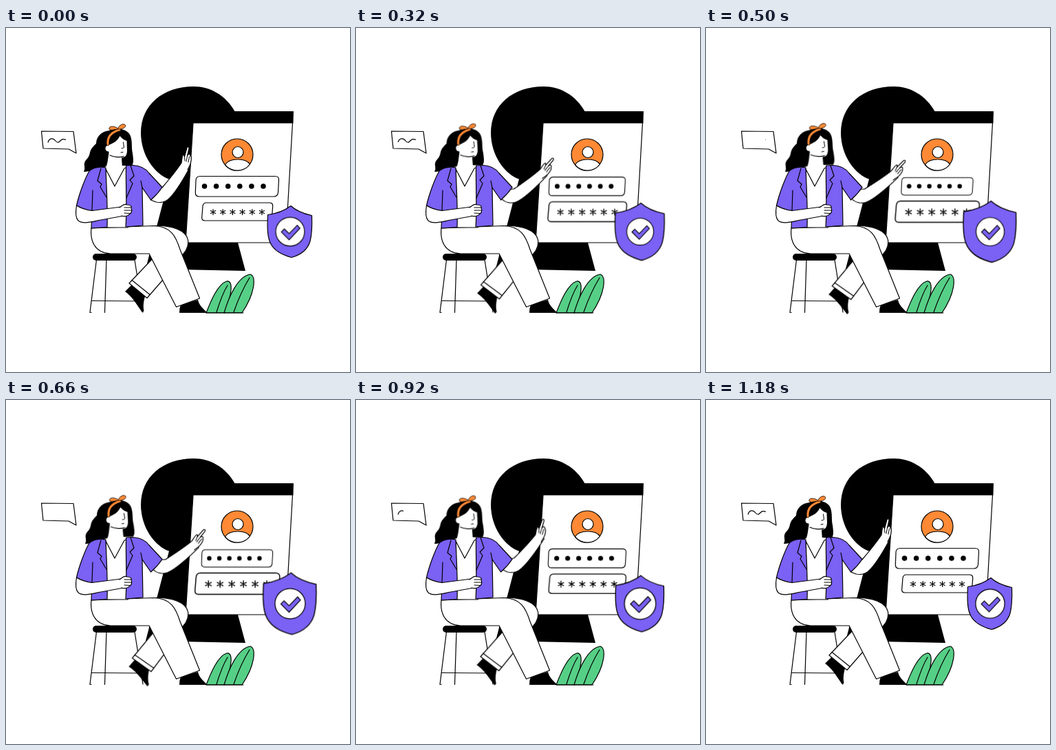
Animation, 500 px wide and 500 px high, one loop 1.2 s. Source, as an HTML page:

```html
<!DOCTYPE html>
<html lang="en">
<head>
<meta charset="utf-8">
<title>Secure sign-in</title>
<style>
html, body { margin: 0; width: 100%; height: 100%; overflow: hidden; background: #fff; }
svg { display: block; width: 100vw; height: 100vh; }

.ln { fill: none; stroke: #000; stroke-width: 1.2; stroke-linejoin: round; stroke-linecap: round; }
.w { fill: #fff; }
.p { fill: #7b61f4; }
.o { fill: #ff8934; }
.g { fill: #56cf86; }
.k { fill: #000; stroke: none; }

/* Slow back-and-forth parts share one sine-like swing */
.swing { animation: 600ms cubic-bezier(.37, 0, .63, 1) infinite alternate; }
#user { transform-origin: 336px 230px; animation-name: shrink; }
#pass { transform-origin: 336px 267px; animation-name: grow; }
#shield { transform-origin: 412.5px 296px; animation-name: grow; }
#badge { transform-origin: 413px 296px; animation-name: pulse; animation-delay: -930ms; }
#farLeg { transform-origin: 240px 310px; animation-name: kick; }
#head { transform-origin: 155px 180px; animation-name: nod; }

#lift { animation: lift 1200ms ease-in-out infinite; }
#arm { transform-origin: 222px 244px; animation: point 1200ms cubic-bezier(.42, 0, .58, 1) infinite; }
#hand { transform-origin: 260px 199px; animation: wrist 1200ms ease-in-out infinite; }
#note { stroke-dasharray: 100 200; stroke-linecap: butt; animation: note 1200ms linear infinite; }

@keyframes shrink { to { transform: scale(.85); } }
@keyframes grow { to { transform: scale(1.2); } }
@keyframes pulse { from { transform: scale(.92); } to { transform: scale(1.08); } }
@keyframes kick { to { transform: rotate(-4.2deg); } }
@keyframes nod { to { transform: translate(1.4px, -.8px) rotate(-1.4deg); } }
@keyframes lift { 0%, 40%, 92%, 100% { transform: none; } 68% { transform: translate(3px, -4px); } }
@keyframes point {
  0%, 91.7%, 100% { transform: none; }
  36.7%, 48.3% { transform: rotate(18deg); }
}
@keyframes wrist {
  0%, 68%, 100% { transform: none; }
  10% { transform: rotate(2deg); }
  28%, 48% { transform: rotate(12deg); }
}
@keyframes note {
  0% { stroke-dashoffset: 0; }
  25% { stroke-dashoffset: 0; animation-timing-function: ease-in-out; }
  43.4%, 45% { stroke-dashoffset: -100; }
  45.01%, 66.7% { stroke-dashoffset: 100; }
  96.7%, 100% { stroke-dashoffset: 0; }
}
</style>
</head>
<body>
<svg viewBox="0 0 500 500" xmlns="http://www.w3.org/2000/svg">
  <defs>
    <path id="star" d="M0-4V4M-3.500-2 3.500 2M-3.500 2 3.500-2"/>
  </defs>

  <!-- Monitor -->
  <g class="k">
    <path d="M273 85C228 85 196 112 196 152C196 185 216 213 238 220H300L333 122C319 97 296 85 273 85Z"/>
    <path d="M240 208 203 350 348 353 337 312 262 312 272 138Z"/>
    <path d="M329 121H418L417.500 138.500H300Z"/>
  </g>
  <path class="ln w" d="M272 138H416.500L406.500 312H261Z"/>

  <g class="ln">
    <circle class="o" cx="336" cy="184" r="23"/>
    <path class="w" d="M318.500 199C321 194 328 191 337 191S352 194 354.500 198A23 23 0 0 1 318.500 199Z"/>
    <circle class="w" cx="337" cy="180.500" r="8"/>
  </g>

  <g id="user" class="swing">
    <path class="ln w" d="M282 215.500H391Q397 215.500 396.500 221L395.500 239Q395 245 389 245H281Q275 245 275.300 239L276 221Q276.500 215.500 282 215.500Z"/>
    <path d="M288.500 230H374.500" fill="none" stroke="#000" stroke-width="7.600" stroke-linecap="round" stroke-dasharray="0 17.100"/>
  </g>
  <g id="pass" class="swing">
    <path class="ln w" d="M291 254H383Q388 254 387.700 259L386.500 275Q386 280 381 280H289Q284.300 280 284.700 275L286 259Q286.500 254 291 254Z"/>
    <g class="ln">
      <use href="#star" x="301" y="267.500"/><use href="#star" x="315.200" y="267.500"/>
      <use href="#star" x="329.400" y="267.500"/><use href="#star" x="343.600" y="267.500"/>
      <use href="#star" x="357.800" y="267.500"/><use href="#star" x="372" y="267.500"/>
    </g>
  </g>

  <g class="ln">
    <g id="shield" class="swing">
      <path class="p" d="M414 258.500C404 266 392 270 380.500 271.500C379.500 292 380 305 385 314C391 325 402 330 415 333.500C428 330 438 323 442 310C445 298 445 285 444.500 272.500C433 270 422 266 414 258.500Z"/>
    </g>
    <g id="badge" class="swing">
      <circle class="w" cx="413" cy="296" r="21.200"/>
      <path class="p" d="M400 296.500 404.500 292 411.500 299 423.500 286.500 427.500 291 411.500 308Z"/>
    </g>
  </g>

  <!-- Plant -->
  <g class="ln">
    <path class="g" d="M291 414C298 396 308 372 321 368C331 367 328 388 318 414Z"/>
    <path class="g" d="M317 414C324 390 337 361 355 358C364 361 362 386 343 414Z"/>
    <path d="M322 374Q314 387 306 413M354 363Q341 384 331 413M291 414H345"/>
  </g>

  <!-- Stool -->
  <g class="ln">
    <path d="M131.500 337 122 413.500M146 337 143.500 413.500M187 337 199 413M125 396.500 196 397M122 413.500H124"/>
    <rect class="k" x="126" y="328" width="64" height="10" rx="5"/>
  </g>

  <!-- Legs -->
  <g class="ln">
    <path class="w" d="M215 287.500C240 286 262 294 264.500 308C266 320 260 327 250 336L222 342Z"/>
    <g id="farLeg" class="swing">
      <path class="k" d="M183 373 173 383C182 389 189 400 198 413.500L200.500 411C199 404 200 398 202 390Z"/>
      <path class="w" d="M179 371 217 331 248 343 205 392.500Z"/>
      <path d="M183 366.500 209 387.500"/>
    </g>
    <path class="k" d="M254 402 279 395C281 405 288 408 292 414H252Q252 407 254 402Z"/>
    <path class="w" d="M124 291C122 308 128 327 152 328H208L247.500 405.500 281.500 393 253 322C247 303 240 288 214 287.500Z"/>
  </g>

  <!-- Head -->
  <g id="head" class="swing">
    <path class="k" d="M150 149C160 143 178 147 181 157C184 166 182 173 184 182C185 190 186 196 183 200H150L130 206C124 207 118 209 113 209Q115 205 114 200T117 191T122 181T131 168C131 157 140 150 150 149Z"/>
    <g class="ln">
      <path class="w" stroke="none" d="M149 170C156 168 162 164 165.500 157C169 161 172 163 175.500 164L176 178C176 185 173 188.500 168 188.500L169 203 158 232 144 205C148 198 148 190 149.500 182Z"/>
      <path d="M151 185C157 188 167 188.500 171 186.500"/>
      <circle class="w" stroke="none" cx="149" cy="175" r="4.500"/>
      <path d="M170.500 166 171.500 173.500Q170 175.500 168 175M167 181 170 180.500" stroke-width="1"/>
      <path d="M148 169C147 157 154 151 165 148" stroke-width="4.600"/>
      <path d="M148 169C147 157 154 151 165 148" stroke="#ff8934" stroke-width="3"/>
      <path class="o" stroke-width=".8" d="M163 147C158 147 152 150 150 147C149 143 155 141 163 146C164 141 171 138 173.500 141C175 145 169 147 164 147Z"/>
    </g>
  </g>

  <!-- Pointing arm -->
  <g id="lift"><g id="arm" class="ln">
    <path class="w" d="M212 238 227 232C238 219 249 206 257 193L268 201C259 218 248 236 239 246C232 254 222 256 211 250Z"/>
    <g id="hand">
      <path class="w" d="M255 196C256 190 256 184 258 184L259.500 187 263 174Q265.500 171 266 175L263.500 186C265 182 268 183 268 186C270 187 269.500 195 267 200L264 206"/>
      <path d="M259.500 187 260 193M263.500 186 262 194M266.500 187 265 195" stroke-width="1"/>
    </g>
  </g></g>

  <!-- Shirt, jacket and resting arm -->
  <g class="ln">
    <path class="w" d="M145 205 158 230 172 204 177 202V290H144Z"/>
    <path class="p" d="M184 199.500C195 200 203 204 208 211L227 231.500Q220 242 210.500 250L198 232 199 287 174 289C176 262 174 230 174.500 200Z"/>
    <path class="p" d="M145 203C136 201 126 203 121 208C115 218 106 242 102.500 258Q112 264 125 265.500L124 291 147 289.500C148 260 146 232 145 203Z"/>
    <path d="M126 236 125 266M198 232 196 222M138 204 133 222 139 227 137 231 146 246M181 200 186 215 180 221 184 226 175 247"/>
    <path class="w" d="M102.500 258C101 267 101 276 105 280C112 286 126 281 138 279L171 273 167 260 125 265.500Q112 264 102.500 258Z"/>
    <path class="w" d="M165 261C169 258 172 255 176 257C181 257 183 259 182 262C184 265 182 270 179 271C177 274 171 274 168 273"/>
    <path d="M172 261 182 261M172 265 182 265M172 269 180 269.500" stroke-width="1"/>
  </g>

  <!-- Speech bubble -->
  <g class="ln" stroke-width="1.1">
    <path class="w" d="M51.500 150 98 150.500 102 182 91 176 54 175Z"/>
    <path id="note" pathLength="100" d="M61 166.500C63 159 69 160 72 164S77 166 80 163S85 163 87 162"/>
  </g>
</svg>
</body>
</html>
```
